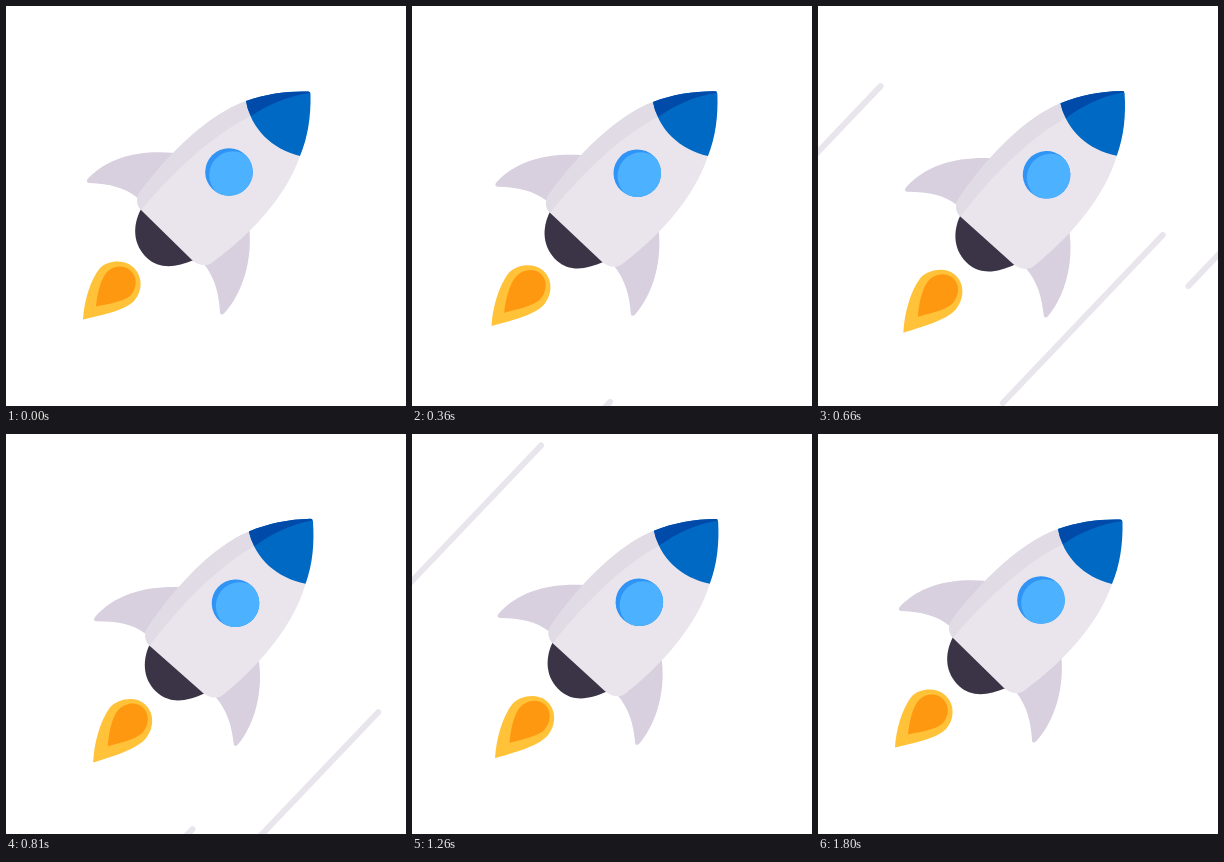
An HTML page for the animation above (3860 ms loop, 400 by 400 pixels).

```html
<!DOCTYPE html>
<html lang="en">
<head>
<meta charset="utf-8">
<title>Rocket</title>
<style>
  html, body { margin: 0; width: 100%; height: 100%; overflow: hidden; background: #fff; }
  svg { display: block; width: 100%; height: 100%; }
</style>
</head>
<body>
<svg viewBox="0 0 400 400">
  <defs>
    <clipPath id="porthole"><circle cx="223" cy="166" r="23.8"/></clipPath>
  </defs>
  <g id="streaks" stroke="#e9e5ed" stroke-width="6" stroke-linecap="round"></g>
  <g id="rocket">
    <g id="outerFlame">
      <path fill="#ffc239" d="M77 313.5C78 296 84 274 94 262C102 254 118 253 127 261C137 270 137 285 128 295C118 305 96 309 77 313.5Z"/>
    </g>
    <g id="innerFlame">
      <path fill="#ff9811" d="M90 300.5C91 288 95 272 101 266C108 259 119 259 125 265C132 272 131 283 124 290C117 296 101 298 90 300.5Z"/>
    </g>
    <path fill="#d8cfdf" d="M82 172.500C104 150 135 144 169 147L150 190L133 193C119 181 103 178 84 177C81 177 80 175 82 172.500Z"/>
    <path fill="#d8cfdf" d="M243 220C247 253 237 287 218 307.500C216 309 214 309 214 306C213 288 209 272 198 258L215 235Z"/>
    <path fill="#3b3447" d="M135 203C126 220 127 239 141 252C153 263 169 262 188 254Z"/>
    <path fill="#eae5ed" d="M240 95C203 108 163 147 134 186C130 192 130 198 135 204L186 254C193 260 201 261 207 256C248 226 281 188 294 150L270 115Z"/>
    <path fill="#e0dbe4" d="M240 95C203 108 163 147 134 186C130 192 130 198 135 204C162 172 203 130 247 109Z"/>
    <path fill="#0069c4" d="M240 95C260 88 280 85 302 85.500Q304.500 85.500 304.500 88C305 110 302 131 294 150C266 143 245 123 240 95Z"/>
    <path fill="#004aa9" d="M240 95C260 88 280 85 302 85.500Q304 85.500 304 87C282 90 263 98 245 110Q241 103 240 95Z"/>
    <circle cx="223" cy="166" r="23.800" fill="#2f94f5"/>
    <circle cx="227" cy="169" r="23.800" fill="#4cb1fe" clip-path="url(#porthole)"/>
  </g>
</svg>
<script>
const LOOP = 3860, FLIGHT = 1800, STEP = 30;
const SPEED = 1.53, LENGTH = 232;
const DIR = { x: -160 / 232, y: 168 / 232 };

// Each streak: where its leading end enters the stage, and when.
const streaks = [
  [400, 184, 17], [139, 0, 436], [400, 171, 456], [400, 362, 400],
  [400, 249, 632], [400, 362, 1062], [140, 0, 1098]
].map(([x, y, start]) => {
  const line = document.createElementNS('http://www.w3.org/2000/svg', 'line');
  document.getElementById('streaks').append(line);
  return { line, x, y, start };
});

const innerStretch = [[0, 0], [210, 5.2], [510, 2.2], [810, 2.5], [1260, 2.2], [1560, 2.8], [1800, 0]];

function interpolate(keys, t) {
  const i = Math.max(1, keys.findIndex(([time]) => time >= t));
  const [t0, a] = keys[i - 1], [t1, b] = keys[i];
  return a + (b - a) * (t - t0) / (t1 - t0);
}

function setTransform(id, value) {
  document.getElementById(id).setAttribute('transform', value);
}

// Lengthens a flame along its axis, away from the engine.
function stretch(id, x, y, length, extra) {
  setTransform(id, `translate(${x} ${y}) rotate(135) scale(${1 + extra / length} 1) rotate(-135) translate(${-x} ${-y})`);
}

function draw(t) {
  const swing = Math.sin(Math.PI * t / FLIGHT);
  setTransform('rocket', `rotate(${-3 * swing * swing} 290 40)`);
  stretch('outerFlame', 134, 256, 80, 6.1 * swing);
  stretch('innerFlame', 127, 264, 51, interpolate(innerStretch, t));

  for (const { line, x, y, start } of streaks) {
    const head = (t - start) * SPEED, tail = head - LENGTH;
    line.setAttribute('x1', x + DIR.x * head);
    line.setAttribute('y1', y + DIR.y * head);
    line.setAttribute('x2', x + DIR.x * tail);
    line.setAttribute('y2', y + DIR.y * tail);
    line.style.display = t > 0 && t < FLIGHT && head > -8 && head < 650 ? '' : 'none';
  }
}

const origin = performance.now();
function frame() {
  const t = Math.max(0, performance.now() - origin) % LOOP;
  draw(Math.min(FLIGHT, Math.floor(t / STEP) * STEP));
  requestAnimationFrame(frame);
}
frame();
</script>
</body>
</html>
```
